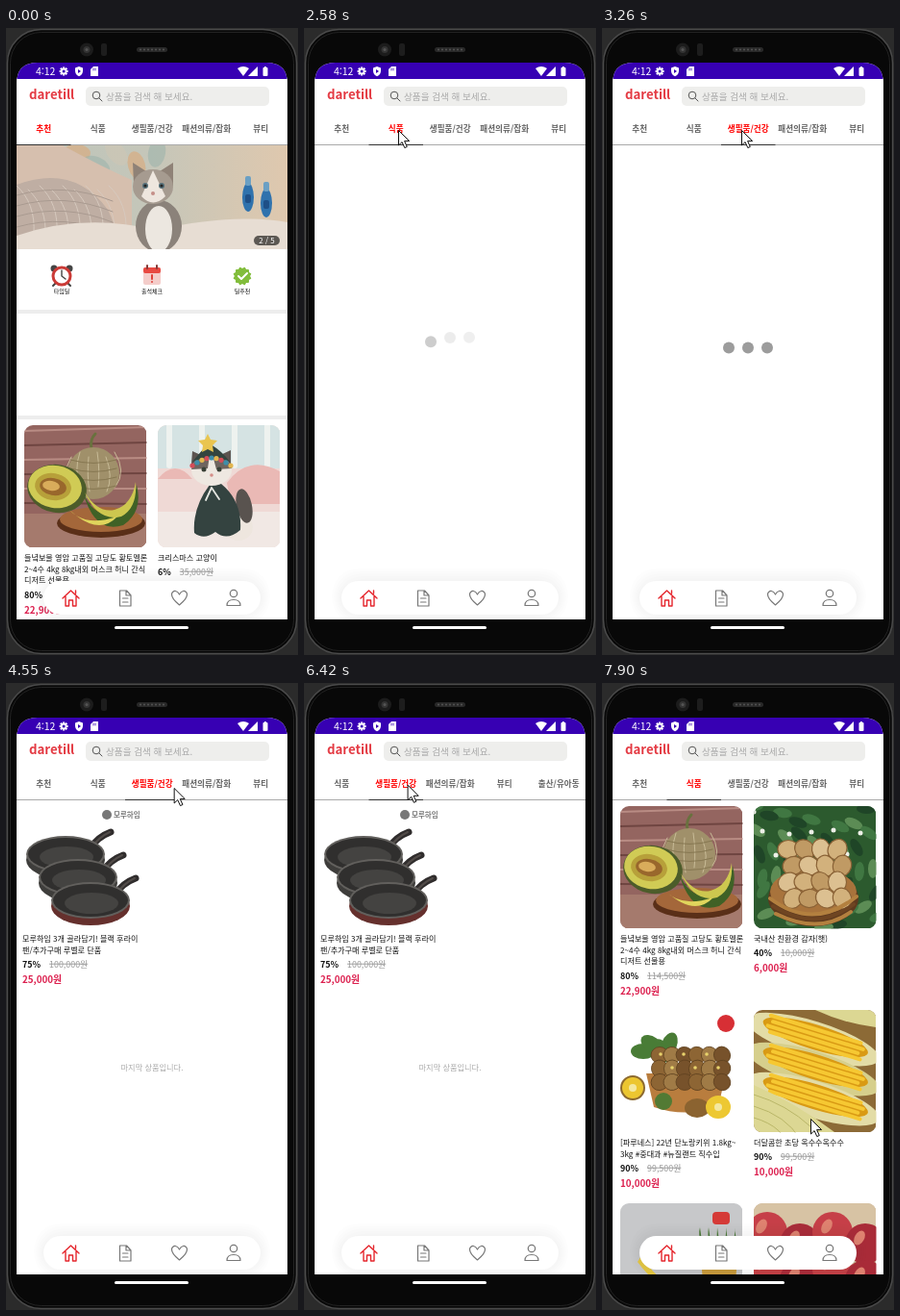
Animation, 304 px wide and 652 px high, one loop 7.99 s. Source, as an HTML page:

```html
<!DOCTYPE html>
<html lang="ko">
<head>
<meta charset="utf-8">
<style>
html, body { margin: 0; height: 100%; overflow: hidden; background: #2b2b2b }
svg { display: block }
text { font-family: "Noto Sans CJK KR", "Noto Sans CJK", "Noto Sans", sans-serif; white-space: pre }
</style>
</head>
<body>
<svg id="stage" width="304" height="652" viewBox="0 0 304 652"></svg>
<script>
const rect = (x, y, w, h, fill, r = 0, more = '') =>
  `<rect x="${x}" y="${y}" width="${w}" height="${h}" rx="${r}" fill="${fill}" ${more}/>`;
const oval = (x, y, rx, ry, fill, turn = 0, more = '') =>
  `<ellipse cx="${x}" cy="${y}" rx="${rx}" ry="${ry}" fill="${fill}" transform="rotate(${turn} ${x} ${y})" ${more}/>`;
const disc = (x, y, r, fill, more) => oval(x, y, r, r, fill, 0, more);
const path = (d, fill, more = '') => `<path d="${d}" fill="${fill}" ${more}/>`;
const line = (d, color, width = 1) =>
  path(d, 'none', `stroke="${color}" stroke-width="${width}" stroke-linecap="round" stroke-linejoin="round"`);
const text = (x, y, str, size, fill = '#111', more = '') =>
  `<text x="${x}" y="${y}" font-size="${size}" fill="${fill}" ${more}>${str}</text>`;
const group = (body, more) => `<g ${more}>${body}</g>`;
const at = (x, y, body, more = '') => group(body, `transform="translate(${x} ${y})" ${more}`);
const many = (n, draw) => Array.from({ length: n }, (_, i) => draw(i)).join('');
const mid = 'text-anchor="middle"', bold = 'font-weight="700"';

// Photos, each drawn in a 127 px square
const photos = {
  melon: rect(0, 0, 127, 127, '#946560') +
    many(6, i => line(`M0 ${6 + i * 15}l127 ${-4 + i}`, i % 2 ? '#6f4541' : '#b98c84', 2)) +
    rect(0, 92, 127, 35, '#a57a6d') +
    oval(80, 102, 46, 15, '#5a2f18') + oval(80, 98, 43, 13, '#a4673a') +
    line('M70 24q-2-9 4-15', '#69713e', 3) + disc(72, 50, 27, '#a0906a') +
    many(6, i => line(`M${49 + i * 9} ${33 - i % 2 * 5}q${i * 5 - 12} 20 1 36`, '#c9bc98')) +
    many(4, i => line(`M48 ${36 + i * 9}q24 7 48 0`, '#867751')) +
    oval(34, 66, 31, 25, '#4c5c2a', 10) + oval(32, 64, 28, 22, '#d0cb55', 10) +
    oval(30, 64, 19, 14, '#b7a03a', 10) + oval(30, 64, 14, 9, '#99672c', 10) + oval(28, 63, 9, 5, '#d9ac5b', 10) +
    path('M61 69q10 27 34 24q18-2 22-31q7 28-14 42q-30 10-42-35', '#3f6126') +
    path('M63 70q14 22 31 18q18-5 22-29q2 27-15 36q-24 6-38-25', '#cdc74f') +
    path('M47 88q16 18 50 7q-20 21-50-7', '#e0d55c'),
  cat: rect(0, 0, 127, 127, '#efd9d5') + rect(0, 0, 127, 45, '#d5e3e3') +
    many(4, i => line(`M${12 + i * 34} 0v42`, '#eef2ef', 6)) +
    path('M0 56q18-22 36 0M72 60q22-30 55-12v34H76', '#eab9b5') + rect(0, 90, 127, 37, '#f1e8e4') +
    oval(84, 106, 15, 14, '#eee6de') + oval(90, 84, 8, 18, '#59534f', -12) +
    path('M54 62q-18 24-16 50q10 8 22-1q12 10 26-2q2-30-20-48', '#344340') +
    path('M35 40l1-13 11 5h16l13-6v16', '#5c5450') + oval(56, 47, 21, 16, '#eee8e1') +
    path('M35 46q4-15 19-15l-2 14M77 45q-5-14-20-14l4 15', '#6f655f') +
    path('M36 38q10-12 16-18h3q12 7 20 18q-20-8-39 0', '#33453f') +
    path('M52 9l3 6 7 1-5 5 1 7-6-3-6 3 1-7-5-5 7-1z', '#e9c550') +
    disc(48, 46, 2.5, '#394036') + disc(64, 46, 2.5, '#394036') + disc(56, 52, 1.8, '#d58f8a') +
    many(9, i => disc(36 + i * 5, 42 - 8 * Math.sin(i * Math.PI / 8), 2.6, ['#d44d59', '#3e8eaa', '#e3b64f'][i % 3])) +
    line('M56 65l-6 13m6-13l8 12', '#e5e6e0', 1.8),
  potato: rect(0, 0, 127, 127, '#2c5a2e') +
    many(44, i => oval(i * 47 % 131, i * 29 % 127, 10, 5, ['#407742', '#1f4527', '#5c8c55'][i % 3], i * 41)) +
    many(10, i => disc(i * 37 % 125, 6 + i * 23 % 47, 2.5, '#eef0e8')) +
    oval(62, 96, 47, 29, '#5f3a1e') + oval(62, 89, 45, 24, '#a8733c') +
    many(16, i => oval(38 + i % 4 * 17 + (i >> 2) % 2 * 5 - 2, 45 + (i >> 2) * 17, 11, 9.500,
      ['#d2b17c', '#c09a64', '#dcc091'][i % 3], i * 41, 'stroke="#8a6236" stroke-width="1.2"')) +
    many(3, i => line(`M${17 + i * 3} ${96 + i * 8}q45 ${34 - i * 6} ${90 - i * 6}-2`, i % 2 ? '#6f4522' : '#b3803f', 4)),
  kiwi: rect(0, 0, 127, 127, '#fff') + disc(110, 14, 9, '#d72f35') +
    many(4, i => oval(24 + i * 9, 43 - i % 2 * 7, 13, 8, '#497c36', i * 37)) +
    path('M27 66h83l-8 35q-35 11-67 0z', '#b97d3e') +
    many(18, i => oval(41 + i % 6 * 13, 47 + Math.floor(i / 6) * 14, 9, 8.500,
      ['#8d6534', '#a07b46', '#77522b'][i % 3], i * 13, 'stroke="#5f4220" stroke-width=".8"')) +
    many(6, i => disc(42 + i * 12, 46 + i % 2 * 14, 1.8, '#e8d36c')) +
    disc(13, 81, 13, '#8c692e') + disc(13, 81, 11, '#ecc630') + disc(13, 81, 4, '#f4e8a0') +
    disc(45, 95, 9, '#527a34') + oval(80, 102, 13, 10, '#8b6330') + oval(102, 101, 13, 12, '#edc832') + disc(102, 101, 4, '#f4e8a0'),
  corn: rect(0, 0, 127, 127, '#8c6a36') +
    many(3, i => at(0, i * 31, group(
      oval(62, 31, 72, 19, i % 2 ? '#d6cf8c' : '#e3dca6') + oval(64, 28, 57, 13, '#d99a14') +
      many(4, j => line(`M${13 + j % 2 * 4} ${20 + j * 5.500}h98`, '#f6c832', 4)), 'transform="rotate(17 63 29)"'))) +
    path('M0 78q46 20 84 49H0M64 0q30 14 63 18V0', '#dcd793') +
    many(3, i => line(`M0 ${88 + i * 12}q34 10 ${60 - i * 12} 34`, '#b9b668')),
  fruit: rect(0, 0, 127, 127, '#c7c8ca') + rect(96, 9, 18, 13, '#d53a37', 4) +
    many(5, i => path(`M101 49q${i * 11 - 23}-7 ${i * 9 - 18}-24q2 17 6 25`, '#4e793b')) +
    oval(103, 68, 18, 27, '#c9993a') + path('M24 51q12 42 60 27q-32 29-66-17', '#e4c844'),
  apple: rect(0, 0, 127, 127, '#cdb597') + path('M0 0h127v24L0 45', '#d7c3a4') +
    many(8, i => disc(14 + i % 4 * 34, 30 + Math.floor(i / 4) * 38 + i % 2 * 12, 21, i % 2 ? '#a92b38' : '#c63f48') +
      oval(8 + i % 4 * 34, 24 + Math.floor(i / 4) * 38 + i % 2 * 12, 5, 8, '#df8270', 30)),
  pans: disc(88, 9, 5, '#777') + text(95, 12, '모루하임', 7.5, '#777', bold) +
    many(3, i => at(i * 13, i * 24,
      line('M70 45Q78 32 92 27', '#302d2d', 7) + line('M72 43Q80 32 91 27', '#514b48', 2) +
      oval(45, 56, 41, 20, i == 2 ? '#65302d' : '#3e3d3b') +
      oval(45, 50, 41, 19, '#62605d') + oval(45, 50, 39, 17, '#302f2e') + oval(46, 53, 28, 11, '#444341'))),
  shirt: rect(0, 0, 127, 127, '#eeece8') +
    path('M43 23q20 12 40 0l28 17-11 24-14-7v49H41V57l-14 7-11-24z', '#818d9d') + line('M43 23q20 20 40 0', '#667383', 3)
};

const photo = (x, y, name) => at(x, y, photos[name], 'clip-path="url(#round)"');

function card(x, y, name, lines, off, was, now) {
  const price = y + 143.5 + lines.length * 12;
  return photo(x, y, name) +
    lines.map((s, i) => text(x, y + 141 + i * 11.7, s, 8.1)).join('') +
    text(x, price, `<tspan ${bold}>${off}%</tspan><tspan dx="9" fill="#999" text-decoration="line-through">${was}원</tspan>`, 8.9) +
    text(x, price + 16.7, now, 9.8, '#dc1f4e', bold);
}
const melonText = ['들녘보물 영암 고품질 고당도 황토멜론', '2~4수 4kg 8kg내외 머스크 허니 간식', '디저트 선물용'];
const melon = y => card(19, y, 'melon', melonText, 80, '114,500', '22,900원');
const ending = text(152, 403, '마지막 상품입니다.', 8.2, '#aaa', mid);

const bottle = (x, y) => oval(x, y, 6, 15, '#2f72ad') + rect(x - 3, y - 22, 6, 10, '#6ba0c4', 2) + rect(x - 3, y - 3, 6, 9, '#1e4f87', 2);
const banner = rect(0, 0, 282, 108, 'url(#room)') +
  many(5, i => oval(62 + i * 21, 8 + i % 2 * 13, 15, 9, ['#dca878', '#9fb5ac', '#cfc6b4'][i % 3], i * 25, 'opacity=".6"')) +
  path('M0 0h48q44 24 72 36v72H0', '#d6bfae') + path('M0 41q60-22 95 26q13 27 8 41H0', '#bfaea3') +
  many(9, i => line(`M${i * 12} ${42 + i % 2 * 4}q20 18 18 50`, '#d6c9be')) +
  many(5, i => line(`M0 ${52 + i * 11}q50-14 100 6`, '#a99a90')) +
  path('M0 94q70-24 145-6q80-18 137-8v28H0', '#e7ddd3') + bottle(241, 54) + bottle(260, 60) +
  oval(148, 84, 24, 27, '#8b827a') + oval(148, 87, 14, 24, '#ece7e0') +
  path('M122 41l-1-23 14 9h14l14-9v24', '#8f8277') + oval(142, 43, 21, 18, '#a69b90') +
  path('M142 26l-12 27q12 13 25 0z', '#eee6de') +
  disc(134, 42, 3, '#55707a') + disc(151, 42, 3, '#55707a') + disc(142, 50, 2, '#c58f88') +
  disc(134, 42, 1.6, '#242424') + disc(151, 42, 1.6, '#242424') +
  rect(247, 94, 27, 10, '#5c5853', 5) + text(260.5, 102, '2 / 5', 8, '#fff', mid);

const shortcuts =
  disc(50, 250, 3.5, '#454545') + disc(66, 250, 3.5, '#454545') + line('M52 265l-3 3m15-3l3 3', '#444', 2) +
  disc(58, 258, 9, '#fff', 'stroke="#cb3b37" stroke-width="3"') + line('M58 252v6l4 3', '#444', 1.4) +
  rect(143, 249, 18, 18, '#f4cdca', 2) + rect(143, 249, 18, 6, '#e84942', 2) +
  line('M147 247v3m10-3v3', '#873b38', 2) + line('M152 257v4m0 3v.1', '#df403a', 2) +
  many(3, i => `<rect x="239" y="251" width="14" height="14" rx="1" fill="#82bd3c" transform="rotate(${i * 30} 246 258)"/>`) +
  line('M242 258l3 3 6-6', '#fff', 2) +
  ['타임딜', '출석체크', '딜추천'].map((s, i) => text(58 + i * 94, 276, s, 6, '#111', mid)).join('');

const pages = {
  home: at(11, 122, banner, 'clip-path="url(#strip)"') + shortcuts +
    rect(11, 293, 282, 4, '#ededed') + rect(11, 403, 282, 4, '#ededed') +
    melon(413) + card(158, 413, 'cat', ['크리스마스 고양이'], 6, '35,000', ''),
  food: melon(128) + card(158, 128, 'potato', ['국내산 친환경 감자(햇)'], 40, '10,000', '6,000원') +
    card(19, 340, 'kiwi', ['[파루네스] 22년 단노랑키위 1.8kg~', '3kg #중대과 #뉴질랜드 직수입'], 90, '99,500', '10,000원') +
    card(158, 340, 'corn', ['더달콤한 초당 옥수수옥수수'], 90, '99,500', '10,000원') +
    photo(19, 541, 'fruit') + photo(158, 541, 'apple'),
  pan: card(17, 128, 'pans', ['모루하임 3개 골라담기! 블랙 후라이', '팬/추가구매 루벨로 단품'], 75, '100,000', '25,000원') + ending,
  fashion: card(17, 128, 'shirt', ['남녀공용 데일리 면 반팔 티셔츠', '기본 라운드 단품'], 50, '20,000', '10,000원') + ending,
  load: many(3, i => `<circle class="dot" cx="${132 + i * 20}" r="6" fill="#9c9c9c"/>`)
};

const tabNames = ['추천', '식품', '생필품/건강', '패션의류/잡화', '뷰티', '출산/유아동'];
const tabWidth = 56.5;
const header = rect(11, 52, 282, 70, '#fff') +
  text(24, 74, 'daretill', 13.2, '#e43a43', 'font-weight="900"') +
  rect(83, 61, 191, 20, '#eeeeec', 5) + disc(94, 70, 3.8, 'none', 'stroke="#555"') + line('M97 73l3 3', '#555') +
  text(104, 74.5, '상품을 검색 해 보세요.', 9.6, '#aaa') + rect(11, 121, 282, 1, '#aaa') +
  group(tabNames.map((s, i) => text(39.2 + i * tabWidth, 108, s, 8.6, '#666', `class="tab" ${bold} ${mid}`)).join('') +
    rect(11, 121, tabWidth, 1, '#333', 0, 'id="mark"'), 'id="tabs"');

const status = rect(11, 36, 282, 17, '#3700b3') + text(31, 49, '4:12', 10.5, '#fff') +
  many(4, i => `<rect x="59" y="40.5" width="2.2" height="9" fill="#fff" transform="rotate(${i * 45} 60.1 45)"/>`) +
  disc(60.1, 45, 3.2, '#fff') + disc(60.1, 45, 1.5, '#3700b3') +
  path('M76 40l4 1.6v3q0 4-4 5.6q-4-1.6-4-5.6v-3z', '#fff') + path('M75 43l3 2-3 2z', '#3700b3') +
  path('M91 40h5v10h-8v-7z', '#fff') + line('M91 42v2m2-2v2', '#3700b3', .8) +
  path('M241 42q6-4 12 0l-6 8z', '#fff') + path('M262 40v10h-10z', '#fff') + rect(267.5, 41, 5, 9, '#fff', 1) + rect(269, 40, 2, 2, '#fff');

const nav = many(5, i => rect(29 + i * 2, 562 + i * 2.6, 246 - i * 4, 58 - i * 4.6, '#000', 27, 'opacity=".007"')) +
  rect(39, 575, 226, 35, '#fff', 17.5) +
  line('M59 593l8.5-8 8.5 8M62 591v10h3.5v-6h4v6H73v-10M72.5 588v-3', '#e5262d', 1.4) +
  line('M118.5 585h7l4.5 5v11h-11.5zM125 585v5h5M121.5 593h5.5m-5.5 4h5.5', '#777', 1.2) +
  line('M180.5 600C168 590 173 585 176.5 585.5Q179 586 180.5 589Q182 586 184.5 585.5C188 585 193 590 180.5 600z', '#777', 1.2) +
  disc(237, 588, 3.7, 'none', 'stroke="#777" stroke-width="1.2"') + line('M230 600.5q0-6 7-6t7 6z', '#777', 1.2);

const phone = rect(0, 0, 304, 652, '#2b2b2b') +
  rect(1.5, 1.5, 301, 649, '#080808', 35, 'stroke="#4a4a4a" stroke-width="1.5"') +
  rect(4.5, 4.5, 295, 643, 'none', 32, 'stroke="#222"') +
  disc(84, 22.5, 7, '#1c1c1c') + disc(84, 22.5, 3.5, '#343434') + disc(84, 22.5, 1.5, '#555') +
  rect(99, 16, 6, 13, '#1d1d1d', 2) + rect(136, 20, 32, 5, '#292929', 2.5) +
  many(7, i => disc(140 + i * 4, 22.5, 1, '#555')) + rect(113, 622, 77, 3, '#fff', 1.5);

const stage = document.getElementById('stage');
stage.innerHTML = `<defs>
  <clipPath id="round">${rect(0, 0, 127.5, 127.5, '#000', 9)}</clipPath>
  <clipPath id="strip">${rect(0, 0, 282, 108, '#000')}</clipPath>
  <clipPath id="screen"><path d="M11 615V58q0-22 22-22h238q22 0 22 22v557z"/></clipPath>
  <linearGradient id="room"><stop stop-color="#bcc5bb"/><stop offset=".5" stop-color="#c5c6b9"/><stop offset="1" stop-color="#dfc8ae"/></linearGradient>
  </defs>` + phone +
  group(rect(11, 36, 282, 579, '#fff') +
    Object.entries(pages).map(([name, body]) => group(body, `id="${name}"`)).join('') + header + status + nav, 'clip-path="url(#screen)"') +
  path('M.5.5v15.5l3.6-3.4 2.7 6 2.5-1.1-2.7-5.9h5z', '#fff', 'id="cursor" stroke="#111"');

// Times are counted in screen refreshes: 81 per loop
const loop = 7990, ticks = 81;
// [start, page, active tab, start of the loading dots]
const scenes = [
  [0, 'home', 0], [17, 'load', 1, 17.8], [27, 'food', 1], [33, 'load', 2, 33], [43, 'pan', 2],
  [49, 'load', 3, 49], [60, 'fashion', 3], [65, 'pan', 2], [76, 'food', 1]
];
const pointer = [
  [6, 203, 456], [12, 95, 106], [16, 95, 106], [18, 98, 106], [27, 98, 106], [30, 145, 106], [42, 145, 106],
  [43, 144, 107], [44, 144, 107], [47, 190, 110], [49, 190, 110], [55, 127, 110], [57, 127, 110],
  [60, 108, 106], [64, 108, 106], [71, 105, 104], [77, 105, 104], [80, 217, 453]
];
const $ = id => document.getElementById(id);
const dots = [...document.querySelectorAll('.dot')], tabs = [...document.querySelectorAll('.tab')];
const ease = p => { p = Math.min(1, Math.max(0, p)); return p * p * (3 - 2 * p); };

function render(k) {
  const [, page, active, start] = scenes.findLast(s => s[0] <= k);
  for (const name in pages) $(name).style.display = name === page ? '' : 'none';
  tabs.forEach((tab, i) => tab.setAttribute('fill', i === active ? '#f00' : '#666'));
  $('mark').setAttribute('x', 11 + active * tabWidth);
  const scroll = tabWidth * (ease((k - 49) / 3) - ease((k - 65) / 3));
  $('tabs').setAttribute('transform', `translate(${-scroll} 0)`);

  if (page === 'load') dots.forEach((dot, i) => {
    const angle = Math.max(0, (k - start) * 32 - i * 52) * Math.PI / 180;
    const rise = (1 - Math.cos(angle)) / 2;
    dot.setAttribute('cy', 332.5 - rise * 11.2);
    dot.setAttribute('opacity', 1 - rise * .87);
  });

  $('cursor').style.display = k < pointer[0][0] ? 'none' : '';
  const next = Math.max(1, pointer.findIndex(p => p[0] >= k));
  const [a, x0, y0] = pointer[next - 1], [b, x1, y1] = pointer[next], p = (k - a) / (b - a);
  $('cursor').setAttribute('transform', `translate(${x0 + (x1 - x0) * p} ${y0 + (y1 - y0) * p})`);
}
function frame() {
  const t = performance.now() % loop;
  render(Math.min(ticks - 1, Math.floor((t + 8) * ticks / loop)));
  requestAnimationFrame(frame);
}
frame();
</script>
</body>
</html>
```
